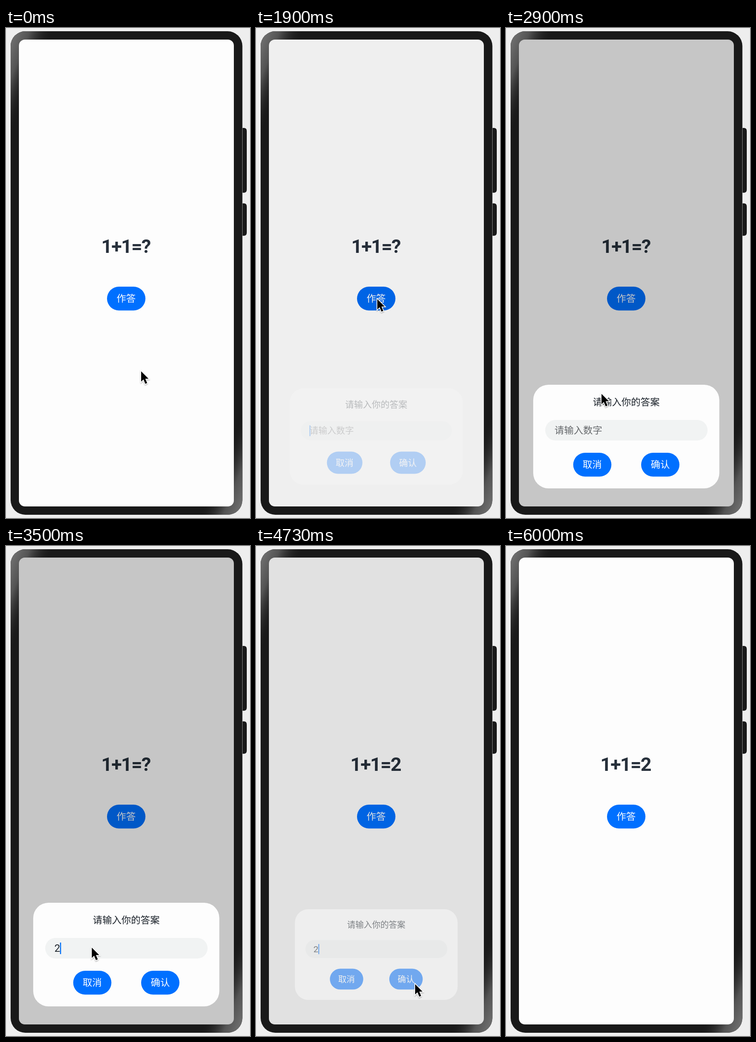
An HTML page for the animation above (6030 ms loop, 529 by 1059 pixels).

```html
<!DOCTYPE html>
<html lang="zh">
<head>
<meta charset="utf-8">
<title>1+1=?</title>
<style>
  html, body { margin: 0; width: 100%; height: 100%; overflow: hidden; background: #eee; }
  svg { display: block; width: 100%; height: 100%; }
  text { font: 400 20.7px "Noto Sans CJK SC", "Noto Sans CJK", sans-serif; white-space: pre; }
  .mid { text-anchor: middle; }
  .label { font-weight: 500; fill: #fff; text-anchor: middle; }
  #sum { font: 700 41.5px Roboto, Inter, sans-serif; letter-spacing: -1.7px; fill: #27303b; }
  #typed { font: 400 22px Roboto, Inter, sans-serif; fill: #1b222a; }
</style>
</head>
<body>
<svg viewBox="0 0 529 1059">
  <defs>
    <linearGradient id="shine" gradientUnits="userSpaceOnUse" x1="23" y1="9.5" x2="91" y2="37.3">
      <stop offset="0" stop-color="#6b6b6b"/>
      <stop offset=".35" stop-color="#545454"/>
      <stop offset="1" stop-color="#191919" stop-opacity="0"/>
    </linearGradient>
    <filter id="shadow" x="-60%" y="-40%" width="220%" height="190%">
      <feDropShadow dx="0" dy="1.5" stdDeviation="1.3" flood-color="#000" flood-opacity=".35"/>
    </filter>
  </defs>

  <rect width="529" height="1059" fill="#eee"/>
  <path d="M513 216h3q6 0 6 7v126q0 7-6 7h-3zM513 379h3q6 0 6 7v56q0 7-6 7h-3z" fill="#191919"/>
  <rect x="10" y="7" width="502.5" height="1045" rx="32" fill="#191919"/>
  <rect x="10" y="7" width="502.5" height="1045" rx="32" fill="url(#shine)"/>
  <rect x="10" y="7" width="502.5" height="1045" rx="32" fill="url(#shine)" transform="rotate(180 261.25 529.5)"/>
  <rect x="28" y="25" width="466" height="1009" rx="13" fill="#fdfdfd"/>

  <text id="sum" y="486"></text>
  <rect id="answer" x="219" y="559" width="83.3" height="51.5" rx="25.75"/>
  <text class="label" x="260.5" y="592.3">作答</text>
  <rect id="mask" x="28" y="25" width="466" height="1009" rx="13"/>

  <g id="dialog">
    <rect x="59" y="771" width="403.5" height="224" rx="33" fill="#fdfdfd"/>
    <text class="mid" x="260.7" y="816.3" fill="#1b222a">请输入你的答案</text>
    <rect x="85" y="847" width="352" height="44.5" rx="22.25" fill="#f1f3f3"/>
    <text id="hint" x="105.3" y="877" fill="#66696c">请输入数字</text>
    <text id="typed" x="105" y="877">2</text>
    <rect id="caret" y="857" width="2.4" height="25" fill="#0a73f5"/>
    <rect x="145.7" y="918" width="82.8" height="51.5" rx="25.75" fill="#0070ff"/>
    <rect x="293" y="918" width="83" height="51.5" rx="25.75" fill="#0070ff"/>
    <text class="label" x="187" y="951.3">取消</text>
    <text class="label" x="334.5" y="951.3">确认</text>
  </g>

  <g id="cursor" filter="url(#shadow)">
    <path d="M1 2V24.3L6 19.6L10 29l4-1.7-4-9.2h7z" fill="#000" stroke="#fff" stroke-width="3"
      stroke-linejoin="miter" paint-order="stroke"/>
  </g>
</svg>
<script>
const LOOP = 6030;
const OPEN = 1850, CLOSE = 4630, FADE = 200, TYPED = 3290, GONE = 5130;

// time, x, y of the pointer tip
const path = [
  [0, 292, 740], [200, 348, 655], [420, 330, 535], [640, 226, 492], [830, 198, 485],
  [1060, 236, 548], [1290, 262, 584], [2560, 262, 584], [3080, 185, 866],
  [3810, 185, 866], [4400, 344, 945], [4800, 344, 945], [5030, 350, 808],
  [5070, 352, 500], [5100, 352, 258], [GONE, 352, 258]
];

const $ = id => document.getElementById(id);
const set = (id, attrs) => {
  for (const key in attrs) $(id).setAttribute(key, attrs[key]);
};
const show = (id, on) => set(id, { visibility: on ? 'visible' : 'hidden' });
const clamp = v => Math.min(1, Math.max(0, v));
const between = (t, a, b) => t >= a && t < b;
const easeOut = p => 1 - Math.pow(1 - p, 2.6);

// Hermite curve with flat ends wherever the pointer rests or turns
function slope(i, k) {
  const a = path[i - 1], b = path[i], c = path[i + 1];
  if (!a || !c) return 0;
  const before = (b[k] - a[k]) / (b[0] - a[0]);
  const after = (c[k] - b[k]) / (c[0] - b[0]);
  return before * after > 0 ? 2 * before * after / (before + after) : 0;
}

function pointer(t) {
  let i = 0;
  while (i < path.length - 2 && t >= path[i + 1][0]) i++;
  const a = path[i], b = path[i + 1], d = b[0] - a[0];
  const u = clamp((t - a[0]) / d), u2 = u * u, u3 = u2 * u;
  return [1, 2].map(k =>
    a[k] * (2 * u3 - 3 * u2 + 1) + b[k] * (3 * u2 - 2 * u3) +
    d * (slope(i, k) * (u3 - 2 * u2 + u) + slope(i + 1, k) * (u3 - u2)));
}

function draw(t) {
  const solved = t >= CLOSE;
  $('sum').textContent = solved ? '1+1=2' : '1+1=?';
  set('sum', { x: solved ? 204.5 : 206.5 });

  const rise = clamp((t - OPEN) / FADE), fall = clamp((t - CLOSE) / FADE);
  const alpha = solved ? 1 - fall : rise;
  const size = solved ? 1 - 0.15 * easeOut(fall) : 0.85 + 0.15 * easeOut(rise);
  set('mask', { opacity: 0.22 * alpha });
  set('dialog', {
    opacity: alpha,
    transform: `translate(260.6 883) scale(${size}) translate(-260.6 -883)`
  });

  const typed = t >= TYPED;
  const open = alpha > 0;
  const blink = between(t, 2600, 3100) || between(t, 3830, 4330);
  show('hint', open && !typed);
  show('typed', open && typed);
  show('caret', open && !blink);
  set('caret', { x: typed ? 117 : 105 });

  const [x, y] = pointer(t);
  const hover = t < OPEN + FADE && between(x, 219, 302) && between(y, 559, 610);
  set('answer', { fill: hover ? '#006af2' : '#0070ff' });
  set('cursor', { transform: `translate(${x} ${y})` });
  show('cursor', t < GONE);
}

function tick() {
  draw(performance.now() % LOOP);
  requestAnimationFrame(tick);
}
tick();
</script>
</body>
</html>
```
